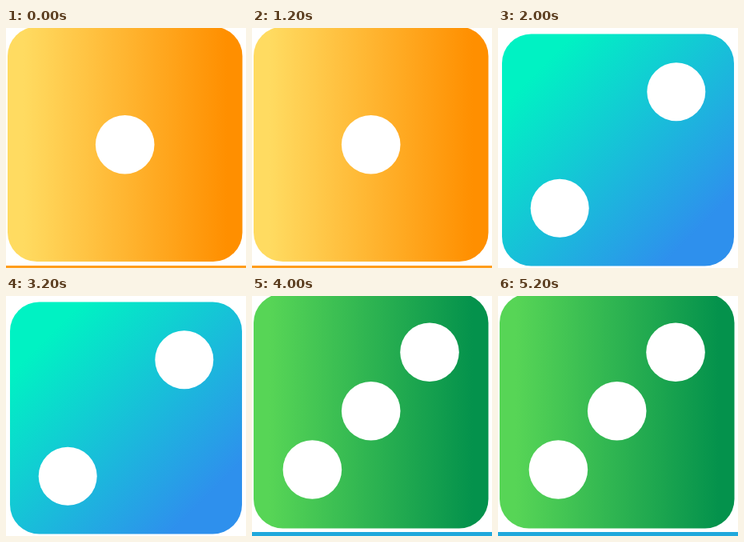
Recreate the animation shown at these times as an HTML page. Size 300 by 300 pixels, loop 6000 ms.

```html
<!DOCTYPE html>
<html lang="en">
<head>
<meta charset="utf-8">
<title>Dice</title>
<style>
html, body { margin: 0; width: 100%; height: 100%; overflow: hidden; background: #fff; }
svg { display: block; width: 100vw; height: 100vh; }
</style>
</head>
<body>
<svg viewBox="0 0 300 300">
  <defs>
    <linearGradient id="amber" gradientUnits="userSpaceOnUse" x1="22" y1="0" x2="276" y2="0">
      <stop offset="0" stop-color="#ffdb61"/><stop offset="1" stop-color="#ff8f00"/>
    </linearGradient>
    <linearGradient id="aqua" gradientUnits="userSpaceOnUse" x1="50" y1="52" x2="250" y2="252">
      <stop offset="0" stop-color="#00f2c3"/><stop offset="1" stop-color="#2e90ed"/>
    </linearGradient>
    <linearGradient id="green" gradientUnits="userSpaceOnUse" x1="22" y1="0" x2="276" y2="0">
      <stop offset="0" stop-color="#57d556"/><stop offset="1" stop-color="#04924c"/>
    </linearGradient>
  </defs>
  <g id="stage"></g>
</svg>
<script>
const HOLD = 2000;
const faces = [
  { fill: "amber", x: 2, y: -1.5, size: 293.5, r: 36.8, pips: [[148.7, 145.8]], line: [297, "#ff9d1c"] },
  { fill: "aqua", x: 5, y: 7.5, size: 290, r: 36.5, pips: [[222.8, 79.8], [77.2, 225.2]] },
  { fill: "green", x: 2, y: -3, size: 293.5, r: 36.8, pips: [[222, 70.3], [148.7, 143.7], [75.4, 217]], line: [295, "#1fa8dc"] }
];
const stage = document.getElementById("stage");

function markup({ fill, x, y, size, r, pips, line }) {
  const dots = pips.map(([cx, cy]) => `<circle cx="${cx}" cy="${cy}" r="${r}" fill="#fff"/>`).join("");
  const edge = line ? `<rect y="${line[0]}" width="300" height="${300 - line[0]}" fill="${line[1]}"/>` : "";
  return `<rect x="${x}" y="${y}" width="${size}" height="${size}" rx="36.5" fill="url(#${fill})"/>${dots}${edge}`;
}

let shown = -1;
function draw(t) {
  const i = Math.floor(t / HOLD) % faces.length;
  if (i === shown) return;
  shown = i;
  stage.innerHTML = markup(faces[i]);
}

const start = performance.now();
function tick() {
  draw(performance.now() - start);
  requestAnimationFrame(tick);
}
tick();
</script>
</body>
</html>
```
